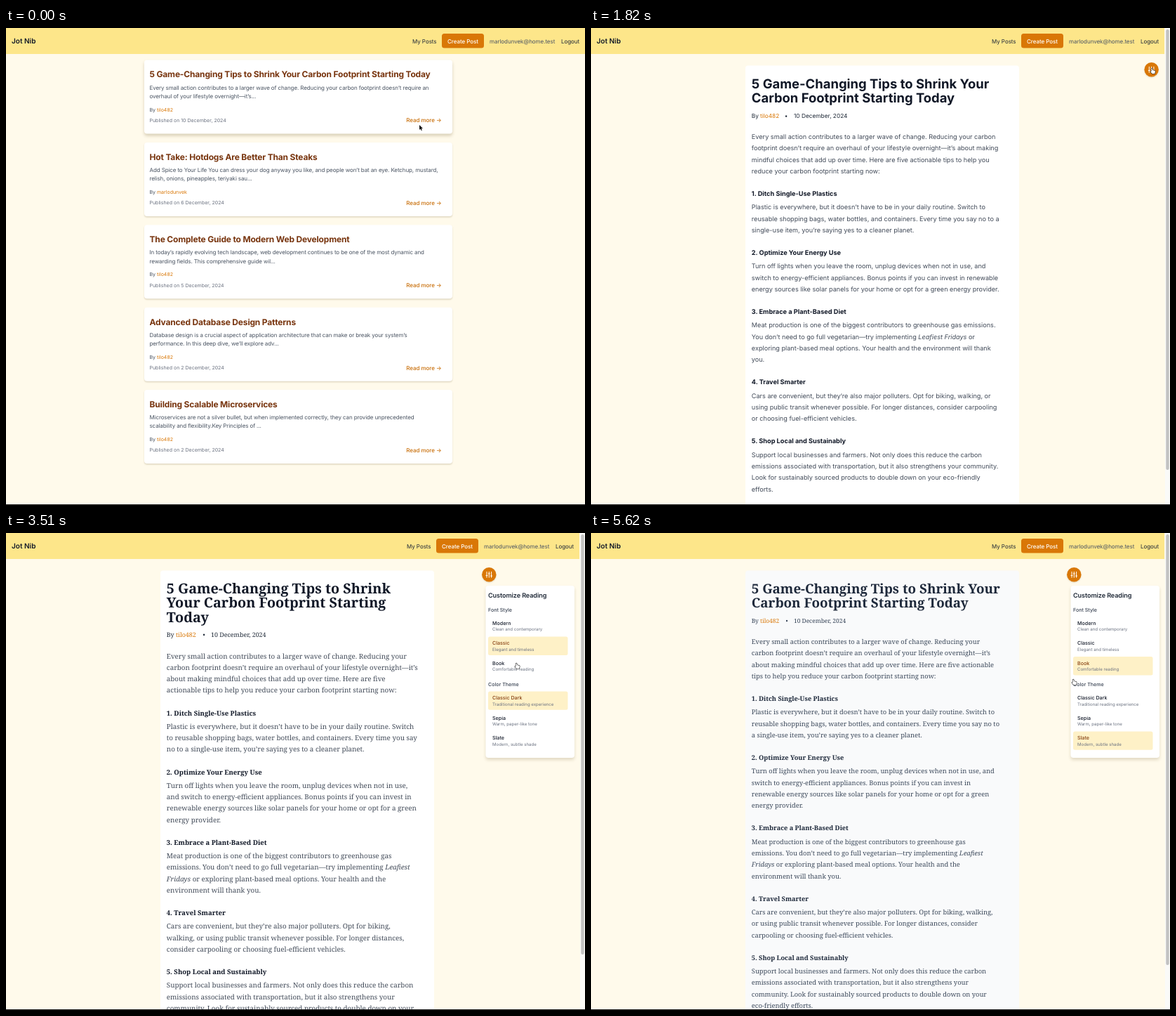
These frames come from a looping animation (825x679 px, 5640 ms). An HTML page with a canvas:

```html
<!DOCTYPE html>
<html lang="en">
<head>
<meta charset="utf-8">
<title>Reading preferences</title>
<style>
html, body { margin: 0; width: 100%; height: 100%; overflow: hidden; background: #fffaeb; }
canvas { display: block; width: 825px; height: 679px; }
</style>
</head>
<body>
<canvas id="stage" width="825" height="679"></canvas>
<script>
const ctx = document.getElementById('stage').getContext('2d');
const LOOP = 5640, OPEN_POST = 660, OPEN_PANEL = 1920;
const SANS = 'Inter, sans-serif', SERIF = '"Noto Serif", serif';
const PAGE = '#fffaeb', AMBER = '#d97706', BROWN = '#78350f';
const BRAND = 'Jot Nib', AUTHOR = 'tilo482', USER = 'marlodunvek', EMAIL = 'marlodunvek@home.test';

const POSTS = [
  ['5 Game-Changing Tips to Shrink Your Carbon Footprint Starting Today',
   'Every small action contributes to a larger wave of change. Reducing your carbon footprint doesn’t require an',
   'overhaul of your lifestyle overnight—it’s...', AUTHOR, '10'],
  ['Hot Take: Hotdogs Are Better Than Steaks',
   'Add Spice to Your Life You can dress your dog anyway you like, and people won’t bat an eye. Ketchup, mustard,',
   'relish, onions, pineapples, teriyaki sau...', USER, '6'],
  ['The Complete Guide to Modern Web Development',
   'In today’s rapidly evolving tech landscape, web development continues to be one of the most dynamic and',
   'rewarding fields. This comprehensive guide wil...', AUTHOR, '5'],
  ['Advanced Database Design Patterns',
   'Database design is a crucial aspect of application architecture that can make or break your system’s',
   'performance. In this deep dive, we’ll explore adv...', AUTHOR, '2'],
  ['Building Scalable Microservices',
   'Microservices are not a silver bullet, but when implemented correctly, they can provide unprecedented',
   'scalability and flexibility.Key Principles of ...', AUTHOR, '2'],
];

// Line breaks per typeface: ^ modern, ~ classic, # book. Underscores toggle italics.
const TITLE = '5 Game-Changing Tips to Shrink~Your^#Carbon Footprint Starting~Today';
const SECTIONS = [
  ['', 'Every small action contributes to a larger wave of change. Reducing your~#carbon^footprint doesn’t require an overhaul of your lifestyle overnight—it’s~#about making^mindful choices that add up over time. Here are five~actionable#tips to help you^reduce your carbon footprint starting now:'],
  ['1. Ditch Single-Use Plastics', 'Plastic is everywhere, but it doesn’t have to be in your daily routine. Switch~to^#reusable shopping bags, water bottles, and containers. Every time you say~no to#a^single-use item, you’re saying yes to a cleaner planet.'],
  ['2. Optimize Your Energy Use', 'Turn off lights when you leave the room, unplug devices when not in use,~and^#switch to energy-efficient appliances. Bonus points if you can invest in~#renewable^energy sources like solar panels for your home or opt for a green~#energy provider.'],
  ['3. Embrace a Plant-Based Diet', 'Meat production is one of the biggest contributors to greenhouse gas~#emissions.^You don’t need to go full vegetarian—try implementing _Leafiest~#Fridays_ or^exploring plant-based meal options. Your health and the~#environment will thank^you.'],
  ['4. Travel Smarter', 'Cars are convenient, but they’re also major polluters. Opt for biking,~walking,#or^using public transit whenever possible. For longer distances,~consider#carpooling^or choosing fuel-efficient vehicles.'],
  ['5. Shop Local and Sustainably', 'Support local businesses and farmers. Not only does this reduce the carbon~#^emissions associated with transportation, but it also strengthens your~#community.^Look for sustainably sourced products to double down on your~#eco-friendly^efforts.'],
];

const FACES = [
  { mark: '^', family: SANS, title: 18.45, body: 9.14, head: 9.2, by: 8.3, date: 289, dot: 278, name: 241, thumb: 629 },
  { mark: '~', family: SERIF, title: 19.75, body: 9.83, head: 9.5, by: 8.9, date: 292, dot: 282, name: 242, thumb: 600 },
  { mark: '#', family: SERIF, title: 18.8, body: 9.36, head: 9.2, by: 8.4, date: 289, dot: 279, name: 241, thumb: 615 },
];
const THEMES = [
  { card: '#ffffff', title: '#111827', head: '#111827', body: '#414a58', by: '#1f2937', name: AMBER },
  { card: PAGE, title: BROWN, head: '#1f2937', body: '#414a58', by: BROWN, name: '#d39a5a' },
  { card: '#f9fafb', title: '#1e293b', head: '#1e293b', body: '#3d4a5c', by: '#334155', name: AMBER },
];
const FACE_TIMES = [0, 2960, 3860], THEME_TIMES = [0, 4630, 5310];
const OPTIONS = [
  ['Font Style', 109.5, [['Modern', 'Clean and contemporary'], ['Classic', 'Elegant and timeless'], ['Book', 'Comfortable reading']]],
  ['Color Theme', 215.8, [['Classic Dark', 'Traditional reading experience'], ['Sepia', 'Warm, paper-like tone'], ['Slate', 'Modern, subtle shade']]],
];

// Pointer tip: time, x, y
const PATH = [
  [0, 589, 138], [260, 589, 138], [480, 594, 131], [1220, 594, 131], [1260, 596, 128],
  [1780, 797, 57], [2060, 797, 57], [2480, 730, 139], [2590, 730, 139], [2760, 722, 157],
  [3300, 722, 157], [3510, 725, 185], [4030, 725, 186], [4080, 725, 209], [4480, 723, 265],
  [4850, 723, 265], [5050, 722, 293], [5540, 722, 293], [5620, 685, 208], [5640, 685, 208],
];

const ease = p => p * p * (3 - 2 * p);
const progress = (t, from, to) => ease(Math.min(1, Math.max(0, (t - from) / (to - from))));
const current = (times, t) => times.filter(start => t >= start).length - 1;

function text(str, x, y, size, color, { weight = 400, family = SANS, track = 0, italic = false, align = 'left' } = {}) {
  ctx.font = `${italic ? 'italic ' : ''}${weight} ${size}px ${family}`;
  ctx.letterSpacing = track + 'px';
  ctx.textAlign = align;
  ctx.fillStyle = color;
  ctx.fillText(str, x, y);
  return x + ctx.measureText(str).width;
}

function box(x, y, w, h, r, color, shadow) {
  ctx.save();
  if (shadow) [ctx.shadowColor, ctx.shadowBlur, ctx.shadowOffsetY] = shadow;
  ctx.fillStyle = color;
  ctx.beginPath();
  ctx.roundRect(x, y, w, h, r);
  ctx.fill();
  ctx.restore();
}

function drawHeader(right) {
  box(0, 0, right, 37, 0, '#fde68a');
  const shift = right - 817;
  const link = { track: -0.05 };
  text(BRAND, 8, 22, 10, '#111827', { weight: 600 });
  text('My Posts', 571 + shift, 21.5, 8, '#1f2937', link);
  box(613 + shift, 8, 60, 20.4, 3.5, AMBER);
  text('Create Post', 643 + shift, 21.5, 8, '#fff', { weight: 500, track: -0.05, align: 'center' });
  text(EMAIL, 681 + shift, 21.5, 8, '#4b5563', link);
  text('Logout', 783 + shift, 21.5, 8, '#1f2937', link);
}

function drawList() {
  POSTS.forEach(([title, first, second, author, day], i) => {
    const y = 45.5 + i * 117.4;
    box(197, y, 439, 105, 4, '#fff', i ? ['rgba(110,90,40,.22)', 2, 1.5] : ['rgba(110,90,40,.26)', 4, 3]);
    text(title, 204.5, y + 24.8, 12, BROWN, { weight: 700, track: -0.17 });
    text(first, 204.5, y + 42, 8, '#4b5563', { track: -0.11 });
    text(second, 204.5, y + 54.2, 8, '#4b5563', { track: -0.11 });
    const x = text('By ', 204.5, y + 73, 7, '#4b5563');
    text(author, x, y + 73, 7, AMBER);
    text(`Published on ${day} December, 2024`, 204.5, y + 88.3, 7, '#6b7280');
    text('Read more →', 620.5, y + 88.8, 8, '#c9700c', { weight: 500, track: -0.05, align: 'right' });
  });
}

function linesFor(str, mark) {
  return str.replace(/[\^~#]+/g, marks => marks.includes(mark) ? '\n' : ' ').split('\n');
}

function drawArticle(face, theme) {
  const { family } = face, x = 228.8;
  box(220, 53.5, 390, 640, 4, theme.card);
  const title = linesFor(TITLE, face.mark);
  title.forEach((line, i) => text(line, x, 86 + i * 20.4, face.title, theme.title, { weight: 700, family }));

  let y = 127.5 + (title.length - 2) * 20.4;
  text('By', x, y, face.by, theme.by, { family });
  text(AUTHOR, face.name, y, face.by, theme.name, { family });
  text('•', face.dot, y, face.by, theme.by, { family, align: 'center' });
  text('10 December, 2024', face.date, y, face.by, theme.by, { family });

  y += 30.6;
  for (const [head, body] of SECTIONS) {
    if (head) {
      text(head, x, y + 0.4, face.head, theme.head, { weight: 700, family });
      y += 19.6;
    }
    const lines = linesFor(body, face.mark);
    let italic = false;
    lines.forEach((line, i) => {
      let pen = x;
      line.split('_').forEach((part, n) => {
        if (n) italic = !italic;
        pen = text(part, pen, y + i * 16.33, face.body, theme.body, { family, italic });
      });
    });
    y += (lines.length - 1) * 16.33 + 31.7;
  }
}

function drawScrollbar(end) {
  box(818, 0, 7, 679, 0, '#fafaf8');
  box(819.3, 2, 4.4, end - 2, 2.2, '#c2c2c2');
}

function drawPanel(open, chosen) {
  const shift = 110.3 * (1 - open);
  ctx.save();
  ctx.beginPath();
  ctx.rect(0, 37, 818, 642);
  ctx.clip();
  ctx.globalAlpha = open;
  if (open) {
    ctx.translate(shift, 0);
    box(683.5, 75, 126.5, 245, 4, '#fff', ['rgba(110,90,40,.2)', 4, 3]);
    text('Customize Reading', 687, 92.3, 9.1, '#1f2937', { weight: 600, track: -0.1 });
    OPTIONS.forEach(([label, top, items], group) => {
      text(label, 687, top + 2.6, 7.1, '#374151', { weight: 500 });
      items.forEach(([name, note], i) => {
        const y = top + 9.6 + i * 28.5, on = chosen[group] === i;
        if (on) box(687, y, 113.5, 26.3, 2.5, '#fef1c7');
        text(name, 693, y + 11.6, 7.1, on ? '#853f10' : '#111827', { weight: 500 });
        text(note, 693, y + 20.3, 6.1, '#6b7280');
      });
    });
  }
  ctx.restore();
  drawToggle(688.3 + shift, 59.3);
}

function drawToggle(x, y) {
  box(x - 10.2, y - 10.2, 20.4, 20.4, 10.2, AMBER, ['rgba(110,80,20,.2)', 2, 1]);
  ctx.strokeStyle = '#fff';
  ctx.lineWidth = 1;
  [[-3.3, 1.2], [0, -1.4], [3.3, 1.8]].forEach(([dx, knob]) => {
    ctx.beginPath();
    ctx.moveTo(x + dx, y - 4.4);
    ctx.lineTo(x + dx, y + 4.4);
    ctx.moveTo(x + dx - 1.4, y + knob);
    ctx.lineTo(x + dx + 1.4, y + knob);
    ctx.stroke();
  });
}

const ARROW = new Path2D('M0 0V7L1.6 5.6L2.7 8L3.9 7.5L2.9 5.1H5Z');
const HAND = new Path2D('M1.5 .8Q2.2 0 2.9 .8V3L6.3 3.7Q7 4 6.9 5L6.2 8H2.6L.2 5.2Q0 4.3 1.5 4.8Z');

function drawPointer(t) {
  const next = Math.max(1, PATH.findIndex(key => key[0] > t));
  const [t0, x0, y0] = PATH[next - 1], [t1, x1, y1] = PATH[next];
  const p = progress(t, t0, t1);
  const overLink = (t >= 400 && t < OPEN_POST) || t >= 1740;
  ctx.save();
  ctx.translate(x0 + (x1 - x0) * p, y0 + (y1 - y0) * p);
  ctx.lineJoin = 'round';
  ctx.lineWidth = 1.2;
  ctx.strokeStyle = overLink ? '#222' : '#fff';
  ctx.fillStyle = overLink ? '#fff' : '#111';
  const shape = overLink ? HAND : ARROW;
  ctx.stroke(shape);
  ctx.fill(shape);
  ctx.restore();
}

function draw(t) {
  ctx.textRendering = 'geometricPrecision';
  box(0, 0, 825, 679, 0, PAGE);
  if (t < OPEN_POST) {
    drawHeader(825);
    drawList();
  } else {
    const chosen = [current(FACE_TIMES, t), current(THEME_TIMES, t)];
    const face = FACES[chosen[0]];
    drawArticle(face, THEMES[chosen[1]]);
    drawHeader(817);
    drawScrollbar(face.thumb);
    drawPanel(progress(t, OPEN_PANEL, OPEN_PANEL + 120), chosen);
  }
  drawPointer(t);
  box(0, 678, 825, 1, 0, '#1a1a1a');
}

const start = performance.now();
function tick() {
  draw((performance.now() - start) % LOOP);
  requestAnimationFrame(tick);
}
tick();
</script>
</body>
</html>
```
